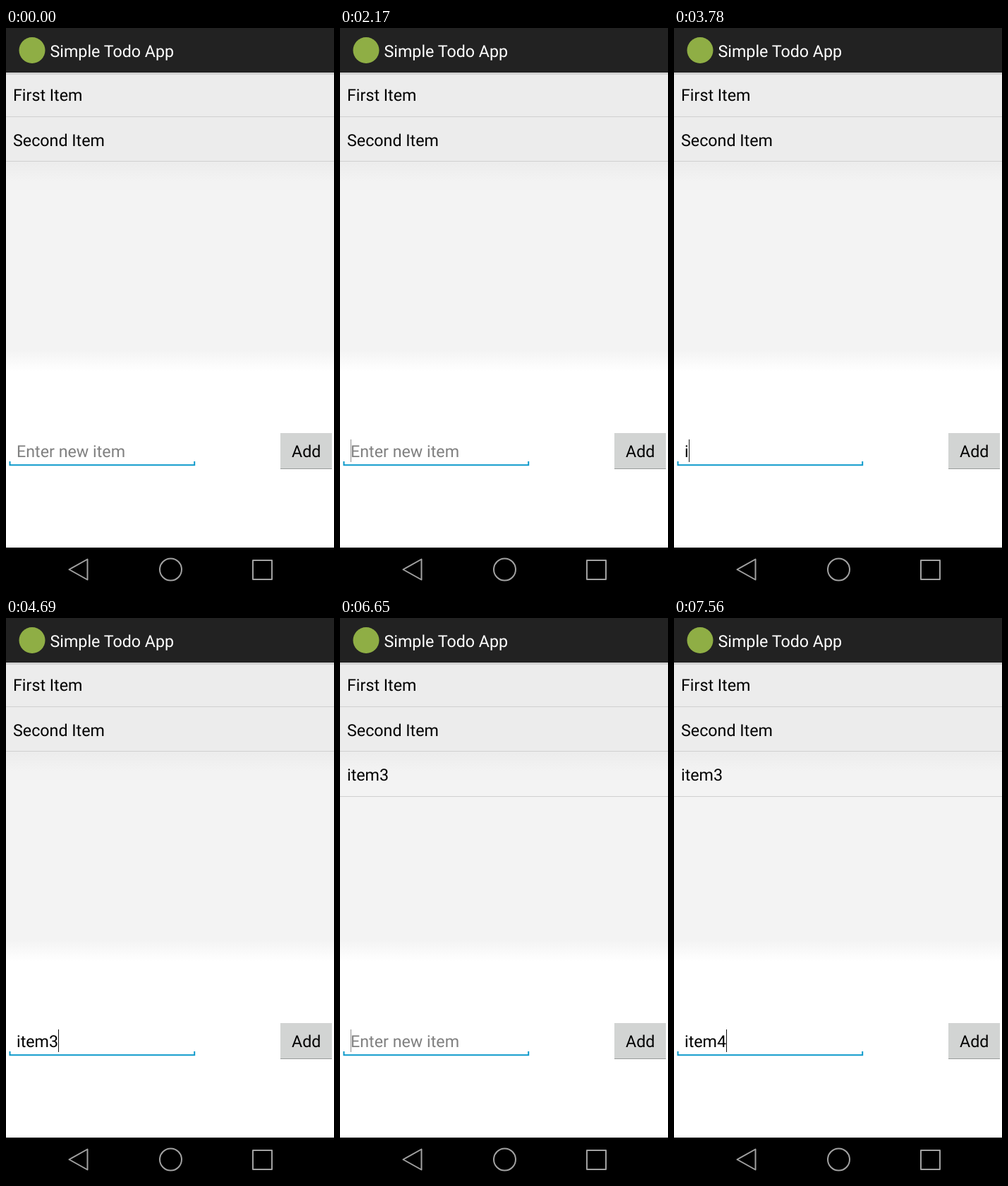
Write an HTML page that moves like this. It is 465 px wide and 795 px high and loops after 8 s.

```html
<!DOCTYPE html>
<html lang="en">
<head>
<meta charset="utf-8">
<title>Simple Todo App</title>
<style>
  html, body { margin: 0; width: 100%; height: 100%; overflow: hidden; background: #fff; }
  svg { display: block; width: 100%; height: 100%; }
  text { font: 23.25px Roboto, sans-serif; text-rendering: geometricPrecision; white-space: pre; }
  .row { fill: #d0d0d0; }
  .nav { fill: none; stroke: #a2a2a2; stroke-width: 2; stroke-linejoin: round; }
</style>
</head>
<body>
<svg viewBox="0 0 465 795">
  <defs>
    <linearGradient id="fade" gradientUnits="userSpaceOnUse" x1="0" y1="66" x2="0" y2="486">
      <stop offset="0" stop-color="#ececec"/>
      <stop offset=".295" stop-color="#ececec"/>
      <stop offset=".36" stop-color="#f3f3f3"/>
      <stop offset=".925" stop-color="#f3f3f3"/>
      <stop offset="1" stop-color="#fff"/>
    </linearGradient>
  </defs>
  <rect width="465" height="795" fill="#fff"/>
  <rect y="63" width="465" height="423" fill="url(#fade)"/>

  <rect width="465" height="63" fill="#222"/>
  <rect y="63" width="465" height="3" fill="#d2d2d2"/>
  <circle cx="37" cy="31.5" r="18.5" fill="#8fae45"/>
  <text x="62.5" y="41" fill="#fff">Simple Todo App</text>

  <text x="10" y="103">First Item</text>
  <rect class="row" y="125" width="465" height="1"/>
  <text x="10" y="166.5">Second Item</text>
  <rect class="row" y="188" width="465" height="1"/>
  <g id="added">
    <text x="10" y="230">item3</text>
    <rect class="row" y="252" width="465" height="1"/>
  </g>

  <path d="M5.5 613V618.2H267.2V613" fill="none" stroke="#0d9acb" stroke-width="2"/>
  <text id="field" x="15" y="607"></text>
  <rect id="caret" y="582" width="1" height="32"/>

  <rect x="389" y="573" width="73" height="51" fill="#d2d4d3"/>
  <rect x="389" y="623" width="73" height="1" fill="#999c9b"/>
  <text x="405" y="607">Add</text>

  <rect y="735" width="465" height="60" fill="#000"/>
  <path class="nav" d="M89.5 766L115.5 751.5V780.5Z"/>
  <circle class="nav" cx="233.5" cy="766" r="15.5"/>
  <rect class="nav" x="350" y="753" width="27" height="27"/>
</svg>
<script>
  const LOOP = 8000, ADD_AT = 5530;
  // times at which the caret switches, starting hidden
  const blinks = [70, 560, 1120, 1610, 2170, 2730, 3290, 6090, 6650];
  const typing = [
    [0, ""],
    [3780, "i"], [4060, "it"], [4130, "ite"], [4200, "item"], [4690, "item3"],
    [ADD_AT, ""],
    [6790, "i"], [6930, "it"], [7000, "ite"], [7140, "item"], [7560, "item4"]
  ];
  const [field, caret, added] = ["field", "caret", "added"].map(id => document.getElementById(id));
  const show = (el, on) => el.setAttribute("visibility", on ? "visible" : "hidden");

  function draw(t) {
    const typed = typing.filter(step => step[0] <= t).pop()[1];
    const text = typed || "Enter new item";
    if (field.textContent !== text) field.textContent = text;
    field.setAttribute("fill", typed ? "#000" : "#808080");
    const width = typed ? field.getComputedTextLength() : 0;
    caret.setAttribute("x", Math.round(15.2 + width));
    caret.setAttribute("fill", typed ? "#111" : "#8c8c8c");
    show(caret, blinks.filter(b => b <= t).length % 2);
    show(added, t >= ADD_AT);
  }

  const start = performance.now();
  function tick() {
    draw((performance.now() - start) % LOOP);
    requestAnimationFrame(tick);
  }
  tick();
</script>
</body>
</html>
```
